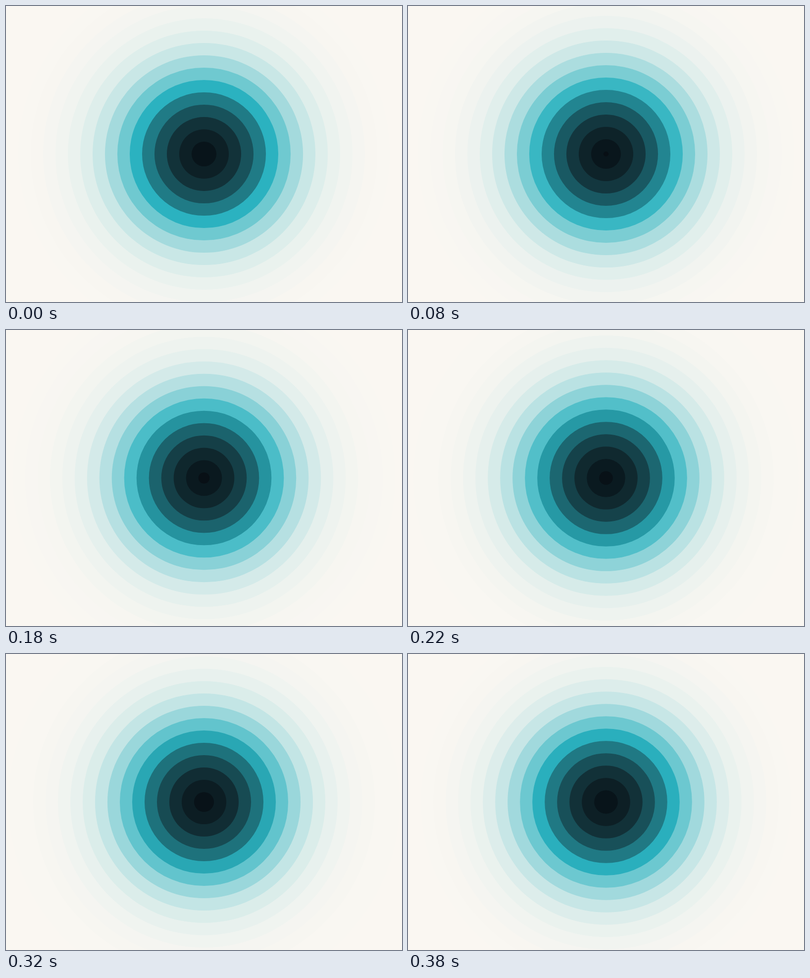
Animation of 800x600 px, one loop 0.4 s. Source, as an HTML page:

```html
<!DOCTYPE html>
<html lang="en">
<head>
<meta charset="utf-8">
<title>Expanding rings</title>
<style>
  html, body { margin: 0; width: 100%; height: 100%; overflow: hidden; background: #faf7f2; }
  svg { display: block; width: 100%; height: 100%; }
</style>
</head>
<body>
<svg id="stage" viewBox="0 0 800 600"></svg>
<script>
const LOOP = 400, GAP = 25, RINGS = 20, PEAK = 150;
const PAPER = [250, 247, 242], TEAL = [43, 178, 192];

// Colours at every GAP pixels from the centre to the teal ring.
const CORE = [
  [8, 14, 20], [8, 20, 26], [13, 32, 38], [18, 50, 57],
  [24, 82, 91], [32, 123, 134], TEAL
];
// Strength of teal over the paper at every GAP pixels beyond it.
const FADE = [1, 0.672, 0.418, 0.238, 0.134, 0.077, 0.043, 0.023, 0.011, 0.005, 0.002, 0];

// Smooth cubic through evenly spaced values.
function curve(list, x) {
  const last = list.length - 1;
  if (x >= last) return list[last];
  const i = Math.floor(x), t = x - i;
  const slope = k => {
    const a = Math.max(k - 1, 0), b = Math.min(k + 1, last);
    return (list[b] - list[a]) / (b - a);
  };
  const d = list[i + 1] - list[i];
  return list[i] + d * t
    + t * (1 - t) * (1 - t) * (slope(i) - d)
    - t * t * (1 - t) * (slope(i + 1) - d);
}

function colour(r) {
  const rgb = PAPER.map((p, c) => r < PEAK
    ? curve(CORE.map(k => k[c]), r / GAP)
    : p + (TEAL[c] - p) * curve(FADE, (r - PEAK) / GAP));
  return `rgb(${rgb.map(Math.round).join(",")})`;
}

const stage = document.getElementById("stage");
const rings = Array.from({ length: RINGS }, () => {
  const ring = document.createElementNS("http://www.w3.org/2000/svg", "circle");
  ring.setAttribute("cx", 400);
  ring.setAttribute("cy", 300);
  stage.prepend(ring);
  return ring;
});

function draw(ms) {
  const shift = (ms % LOOP) / LOOP;
  rings.forEach((ring, i) => {
    const r = (i + shift) * GAP;
    ring.setAttribute("r", r);
    ring.setAttribute("fill", colour(r));
  });
}

function tick(now) {
  draw(now);
  requestAnimationFrame(tick);
}

draw(0);
requestAnimationFrame(tick);
</script>
</body>
</html>
```
